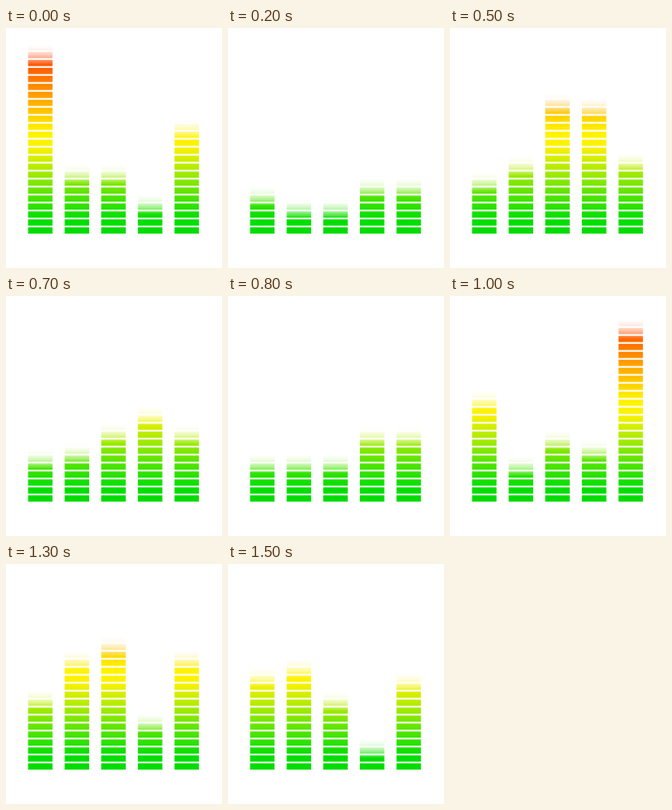
These frames come from a looping animation (270x300 px, 1600 ms). An HTML page with a canvas:

```html
<!DOCTYPE html>
<html lang="en">
<head>
<meta charset="utf-8">
<title>Equalizer</title>
<style>
  html, body { margin: 0; width: 100%; height: 100%; overflow: hidden; background: #fff; }
  canvas { display: block; }
</style>
</head>
<body>
<canvas id="stage" width="270" height="300"></canvas>
<script>
const ctx = document.getElementById('stage').getContext('2d');
const LOOP = 1600, STEP = 100;
const ROWS = 24, PITCH = 9.97, BASE = 257, BAR_W = 30, BAR_GAP = 45.75, LEFT = 27.8;
const FADE = 26;

// Key poses: the height of each bar at a given step.
const POSES = [
  { step: 0, heights: [237, 88, 88, 50, 145] },
  { step: 2, heights: [60, 45, 45, 71, 71] },
  { step: 5, heights: [78, 98, 176, 171, 103] },
  { step: 8, heights: [61, 61, 61, 95, 95] },
  { step: 10, heights: [140, 58, 90, 78, 229] },
  { step: 12, heights: [88, 155, 201, 88, 165] },
  { step: 15, heights: [129, 140, 99, 40, 123] }
];

function gradient(from, to, stops, colorAt) {
  const g = ctx.createLinearGradient(0, from, 0, to);
  for (let i = 0; i <= stops; i++) g.addColorStop(i / stops, colorAt(i));
  return g;
}

// Green gains red up to yellow, then loses green towards red.
const spectrum = gradient(BASE - 4, BASE - 4 - (ROWS - 1) * PITCH, ROWS - 1, row => {
  const red = Math.max(0, Math.min(255, 28 * row - 40));
  const green = Math.min(220 + 2 * row, 480 - 19 * row);
  return `rgb(${red},${green},0)`;
});

function heightsAt(step) {
  const i = Math.max(1, POSES.findIndex(pose => pose.step >= step));
  const a = POSES[i - 1], b = POSES[i];
  const k = (step - a.step) / (b.step - a.step);
  return a.heights.map((h, bar) => h + (b.heights[bar] - h) * k);
}

function drawBar(x, height) {
  ctx.fillStyle = spectrum;
  for (let row = 0; row < ROWS; row++) {
    ctx.fillRect(x - 0.2, BASE - 7.8 - row * PITCH, BAR_W + 0.6, 7.8);
  }
  const top = BASE - height;
  ctx.fillStyle = gradient(top, top + FADE, 8, i => `rgba(255,255,255,${1 - (i / 8) ** 2})`);
  ctx.fillRect(x - 2, 0, BAR_W + 4, BASE + 2);
}

function draw(time) {
  const heights = heightsAt(Math.floor((time % LOOP) / STEP));
  ctx.fillStyle = '#fff';
  ctx.fillRect(0, 0, 270, 300);
  heights.forEach((height, i) => drawBar(LEFT + i * BAR_GAP, height));
}

let start;
function tick(now) {
  start ??= now;
  draw(now - start);
  requestAnimationFrame(tick);
}
draw(0);
requestAnimationFrame(tick);
</script>
</body>
</html>
```
